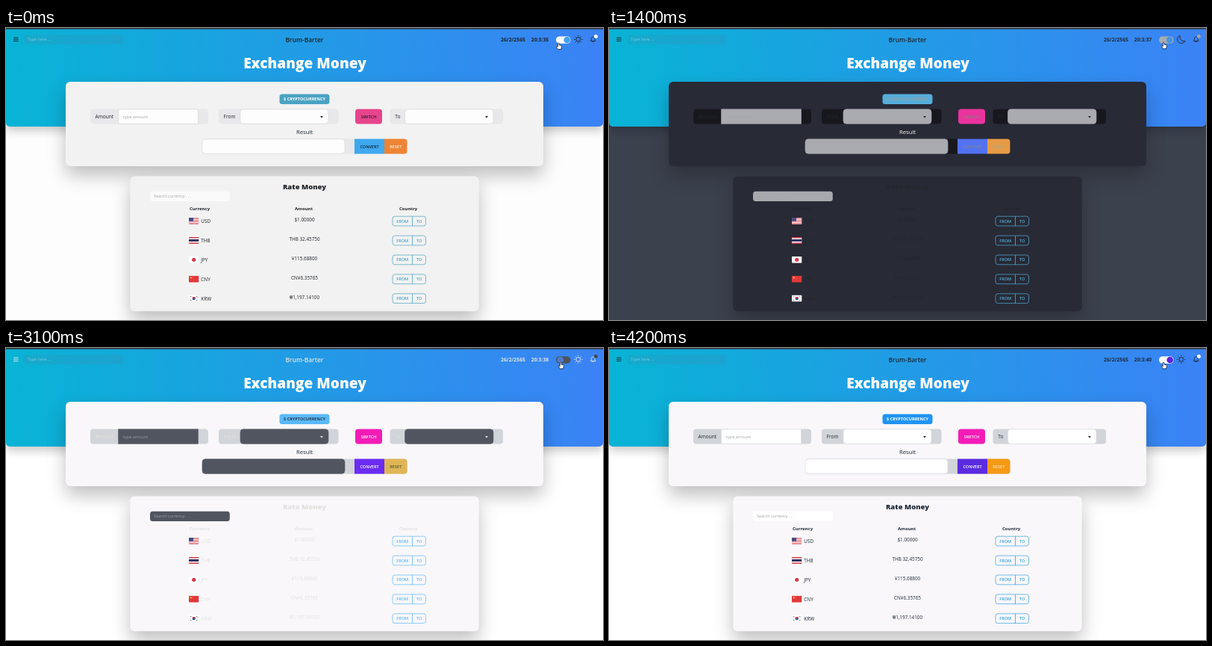
Animation of 800 by 391 pixels, one loop 4.4 s. Source, as an HTML page with a canvas:

```html
<!DOCTYPE html>
<html lang="en">
<head>
<meta charset="utf-8">
<title>Exchange Money</title>
<style>
html, body { margin: 0; width: 100%; height: 100%; overflow: hidden; }
canvas { display: block; width: 800px; height: 391px; }
</style>
</head>
<body>
<canvas id="stage"></canvas>
<script>
const LOOP = 4400, STEP = 100, DARK_AT = 1400, LIGHT_AT = 3100;
const FONT = '"Open Sans", "Noto Sans", sans-serif';
const canvas = document.getElementById('stage');
const ratio = window.devicePixelRatio || 1;
canvas.width = 800 * ratio;
canvas.height = 391 * ratio;
const c = canvas.getContext('2d');
c.scale(ratio, ratio);

const soft = {
  page: '#fdfdfd', card: '#f2f2f2', group: '#e8e7ea', result: '#1f2937',
  text: '#1f2329', hint: '#a3a5aa', input: '#fdfdfd', edge: '#d9d9dc', search: '#fafafa',
  crypto: '#4aa3c2', cryptoText: '#ffffff', pink: '#e5458c', pinkText: '#2b1822',
  convert: '#3fa9f0', convertText: '#12263a', reset: '#ee8434', resetText: '#fff1e4',
  outline: '#4aa3c2', track: '#ffffff', knob: '#3fa0ee', dot: '#ffffff'
};
const dark = {
  page: '#3c414e', card: '#282a36', group: '#17181e', result: '#f8f8f2',
  text: '#f8f8f4', hint: '#9b9ea6', input: '#3d414c', edge: '#555964', search: '#3d414c',
  crypto: '#61bdfb', cryptoText: '#14283a', pink: '#f31cb6', pinkText: '#ffffff',
  convert: '#6d2cf5', convertText: '#ffffff', reset: '#dfb85c', resetText: '#37501a',
  outline: '#61bdfb', track: '#3b3f4a', knob: '#4c86cc', dot: '#30323c'
};
const vivid = {
  page: '#ffffff', card: '#f9f7fa', group: '#d1d4d8', result: '#1f2937',
  text: '#1f2937', hint: '#a3a5aa', input: '#ffffff', edge: '#dcdde2', search: '#ffffff',
  crypto: '#2094f3', cryptoText: '#ffffff', pink: '#f31cb6', pinkText: '#ffffff',
  convert: '#5a2be0', convertText: '#ffffff', reset: '#f59a14', resetText: '#ffe3b4',
  outline: '#36a2dc', track: '#ffffff', knob: '#5a22e0', dot: '#ffffff'
};
const instant = ['page', 'card', 'group', 'result'];
const slow = ['text', 'hint'];

const clamp = x => Math.max(0, Math.min(1, x));
const smooth = x => { x = clamp(x); return x * x * (3 - 2 * x); };
const easeOut = x => 1 - (1 - clamp(x)) ** 2;

function mix(a, b, p) {
  const part = (s, i) => parseInt(s.slice(i, i + 2), 16);
  return 'rgb(' + [1, 3, 5].map(i => Math.round(part(a, i) + (part(b, i) - part(a, i)) * p)) + ')';
}

function blend(a, b, fill, ink) {
  const out = {};
  for (const key in a) {
    const p = instant.includes(key) ? 1 : slow.includes(key) ? ink : fill;
    out[key] = mix(a[key], b[key], p);
  }
  return out;
}

function themeAt(t) {
  if (t < DARK_AT) return { ...soft, knobPos: 1 };
  if (t < LIGHT_AT) {
    const fill = easeOut((t - 1300) / 400);
    return { ...blend(soft, dark, fill, smooth((t - 1350) / 550)), knobPos: 1 - smooth((t - 1350) / 350) };
  }
  const p = smooth((t - 3000) / 500);
  return { ...blend(dark, vivid, p, p), knobPos: p };
}

function box(x, y, w, h, r, fill, stroke) {
  c.beginPath();
  c.roundRect(x, y, w, h, r);
  if (fill) { c.fillStyle = fill; c.fill(); }
  if (stroke) { c.strokeStyle = stroke; c.lineWidth = 0.7; c.stroke(); }
}

function disc(x, y, r, fill) {
  c.beginPath();
  c.arc(x, y, r, 0, 7);
  c.fillStyle = fill;
  c.fill();
}

// y is the middle of the capitals
function text(s, x, y, size, color, weight = 400, align = 'center') {
  c.font = `${weight} ${size}px ${FONT}`;
  c.textAlign = align;
  c.fillStyle = color;
  c.fillText(s, x, y + size * 0.357);
}

function shadowed(blur, dy, alpha, draw) {
  c.save();
  c.shadowColor = `rgba(0,0,0,${alpha})`;
  c.shadowBlur = blur * ratio;
  c.shadowOffsetY = dy * ratio;
  draw();
  c.restore();
}

function sun(x, y, color) {
  c.strokeStyle = color;
  c.lineWidth = 1;
  c.beginPath();
  c.arc(x, y, 2.9, 0, 7);
  for (let i = 0; i < 8; i++) {
    const u = Math.cos(i * Math.PI / 4), v = Math.sin(i * Math.PI / 4);
    c.moveTo(x + u * 4.2, y + v * 4.2);
    c.lineTo(x + u * 5.6, y + v * 5.6);
  }
  c.stroke();
}

function moon(x, y, color) {
  c.strokeStyle = color;
  c.lineWidth = 1;
  c.beginPath();
  c.moveTo(x - 1.6, y - 5);
  c.bezierCurveTo(x - 2.4, y + 0.6, x + 1, y + 3, x + 5.2, y + 2);
  c.bezierCurveTo(x + 3, y + 6.4, x - 3, y + 6, x - 4.7, y + 2);
  c.bezierCurveTo(x - 6, y - 1.2, x - 4.4, y - 4, x - 1.6, y - 5);
  c.stroke();
}

function bell(x, y, color) {
  c.strokeStyle = color;
  c.lineWidth = 0.9;
  c.beginPath();
  c.moveTo(x - 3.4, y + 2);
  c.quadraticCurveTo(x - 2.3, y + 1, x - 2.3, y - 1);
  c.bezierCurveTo(x - 2.3, y - 4.4, x + 2.3, y - 4.4, x + 2.3, y - 1);
  c.quadraticCurveTo(x + 2.3, y + 1, x + 3.4, y + 2);
  c.closePath();
  c.moveTo(x - 1.1, y + 2.4);
  c.quadraticCurveTo(x, y + 4.6, x + 1.1, y + 2.4);
  c.stroke();
}

function clock(t) {
  const second = 35 + [200, 1200, 2600, 3500, 4200].filter(at => t >= at).length;
  return '20:3:' + second;
}

function header(k, t) {
  const g = c.createLinearGradient(0, 0, 800, 0);
  g.addColorStop(0, '#08b4d5');
  g.addColorStop(1, '#3b82f6');
  shadowed(12, 6, 0.2, () => box(0, 0, 800, 132, [0, 0, 5, 5], g));
  c.fillStyle = '#30343d';
  c.fillRect(0, 0, 800, 1.6);

  box(24, 9, 133, 13, 3, 'rgba(70,130,165,.2)');
  text('Type here ...', 29, 15.5, 5.6, 'rgba(190,222,235,.6)', 400, 'left');
  c.fillStyle = k.text;
  for (let i = 0; i < 3; i++) c.fillRect(10, 12.6 + i * 2.2, 6.5, 0.9);
  text('Brum-Barter', 400, 16, 8.4, k.text, 600);
  text('26/2/2565', 679.5, 15.5, 6.8, k.text, 700);
  text(clock(t), 715.5, 15.5, 6.8, k.text, 700);

  box(737, 11.2, 19.5, 9.6, 4.8, k.track);
  disc(741.8 + 9.9 * k.knobPos, 16, 4.3, k.knob);
  (t >= DARK_AT && t < LIGHT_AT ? moon : sun)(766.8, 15.3, k.text);
  bell(786.7, 15.5, k.text);
  disc(790.4, 11.2, 2.5, k.dot);
  text('Exchange Money', 400.5, 47, 19.1, '#ffffff', 800);
}

function field(x, w, label, labelX, inX, inW, k) {
  box(x, 108.5, w, 20, 4, k.group);
  text(label, labelX, 118.7, 6.5, k.text);
  const r = label === 'Amount' ? 0 : 4;
  box(inX, 108.7, inW, 19.6, r, k.input, k.edge);
  if (!r) return text('type amount', 157, 119, 5.6, k.hint, 400, 'left');
  const a = inX + inW - 9;
  c.fillStyle = k.text;
  c.beginPath();
  c.moveTo(a - 2, 118);
  c.lineTo(a + 2, 118);
  c.lineTo(a, 120.4);
  c.fill();
}

function form(k) {
  shadowed(25, 12, 0.25, () => box(80, 72, 640, 113, 6, k.card));
  box(366.5, 88.5, 67, 13.5, 3.5, k.crypto);
  text('$ CRYPTOCURRENCY', 400, 95.3, 5.55, k.cryptoText, 700);
  field(113, 158, 'Amount', 131.8, 150.5, 107, k);
  field(285, 160.5, 'From', 299.5, 314, 118, k);
  field(514.5, 151.5, 'To', 524.8, 534.5, 118.5, k);
  box(468, 108.5, 36, 20, 4, k.pink);
  text('SWITCH', 486, 118.6, 5.5, k.pinkText, 600);

  text('Result', 400, 139, 7.7, k.result);
  box(263, 148.5, 274.5, 20, 4, k.group);
  box(263, 148.7, 191, 19.6, 4, k.input, k.edge);
  box(467, 148.5, 40, 20, 0, k.convert);
  box(507, 148.5, 30.5, 20, [0, 4, 4, 0], k.reset);
  text('CONVERT', 487, 158.6, 5.5, k.convertText, 600);
  text('RESET', 522.3, 158.6, 5.6, k.resetText, 600);
}

function flag(code, x, y) {
  const w = 13.5, h = 9;
  const bar = (color, top, height) => { c.fillStyle = color; c.fillRect(x, y + top, w, height); };
  c.save();
  c.beginPath();
  c.roundRect(x, y, w, h, 0.8);
  c.clip();
  bar(code === 'CNY' ? '#e2373b' : '#ffffff', 0, h);
  if (code === 'USD') {
    for (let i = 0; i < 7; i++) bar('#d9545f', i * 18 / 13, 9 / 13);
    c.fillStyle = '#4a4c82';
    c.fillRect(x, y, 6, 4.8);
  } else if (code === 'THB') {
    bar('#d8303c', 0, 1.5);
    bar('#2d2f63', 3, 3);
    bar('#d8303c', 7.5, 1.5);
  } else if (code === 'JPY') {
    disc(x + w / 2, y + h / 2, 2.6, '#d93a4c');
  } else if (code === 'CNY') {
    disc(x + 2.7, y + 2.6, 1.1, '#f7c948');
    disc(x + 5, y + 1.6, 0.4, '#f7c948');
    disc(x + 5, y + 3.6, 0.4, '#f7c948');
  } else {
    const mx = x + w / 2, my = y + h / 2;
    disc(mx, my, 2.2, '#2f4f96');
    c.fillStyle = '#d23b4a';
    c.beginPath();
    c.arc(mx, my, 2.2, Math.PI, 0);
    c.fill();
    c.strokeStyle = '#444444';
    c.lineWidth = 1;
    for (const sx of [-1, 1]) for (const sy of [-1, 1]) {
      c.beginPath();
      c.moveTo(mx + sx * 3.4, my + sy * 3.1);
      c.lineTo(mx + sx * 4.7, my + sy * 1.8);
      c.stroke();
    }
  }
  c.restore();
}

const rates = [
  ['USD', '$1.00000'], ['THB', 'THB 32.45750'], ['JPY', '¥115.68800'],
  ['CNY', 'CN¥6.35765'], ['KRW', '₩1,197.14100']
];

function table(k) {
  shadowed(25, 12, 0.25, () => box(166.3, 198.5, 467.4, 180.8, 6, k.card));
  text('Rate Money', 400, 212.7, 9.5, k.text, 800);
  box(193, 218.8, 106.8, 13.2, 3.5, k.search);
  text('Search currency . . .', 198, 225.5, 5.6, k.hint, 400, 'left');
  text('Currency', 259.5, 242, 6, k.text, 700);
  text('Amount', 399, 242, 6, k.text, 700);
  text('Country', 539, 242, 6, k.text, 700);
  rates.forEach(([code, amount], i) => {
    const y = 258.5 + i * 25.9;
    flag(code, 245, y - 4.5);
    text(code, 261.3, y + 0.3, 6.4, k.text, 400, 'left');
    text(amount, 400, y - 1.4, 6.35, k.text);
    box(518, y - 6.3, 44.5, 12.8, 3, null, k.outline);
    c.fillStyle = k.outline;
    c.fillRect(544.2, y - 6.3, 0.8, 12.8);
    text('FROM', 531.2, y + 0.2, 5.5, k.outline, 600);
    text('TO', 553.6, y + 0.2, 5.5, k.outline, 600);
  });
}

function hand(x, y) {
  c.beginPath();
  c.moveTo(x - 0.9, y + 0.8);
  c.quadraticCurveTo(x, y - 0.6, x + 0.9, y + 0.8);
  c.lineTo(x + 0.9, y + 3.2);
  c.lineTo(x + 3.6, y + 4);
  c.quadraticCurveTo(x + 4.5, y + 4.4, x + 4.2, y + 6);
  c.lineTo(x + 3.3, y + 9);
  c.lineTo(x - 0.7, y + 9);
  c.lineTo(x - 3, y + 5.6);
  c.quadraticCurveTo(x - 2.6, y + 4.4, x - 0.9, y + 5.6);
  c.closePath();
  c.fillStyle = '#ffffff';
  c.fill();
  c.strokeStyle = '#1b1b22';
  c.lineWidth = 0.8;
  c.stroke();
}

function draw(t) {
  const k = themeAt(t);
  c.fillStyle = k.page;
  c.fillRect(0, 0, 800, 391);
  header(k, t);
  form(k);
  table(k);
  const move = clamp(t / 200);
  hand(740.3 + 2.6 * move + (t >= 600 ? 0.3 : 0), 19.6 - 0.8 * move);
}

const start = performance.now();
function tick() {
  const t = (performance.now() - start) % LOOP;
  draw(Math.floor(t / STEP) * STEP);
  requestAnimationFrame(tick);
}
tick();
</script>
</body>
</html>
```
